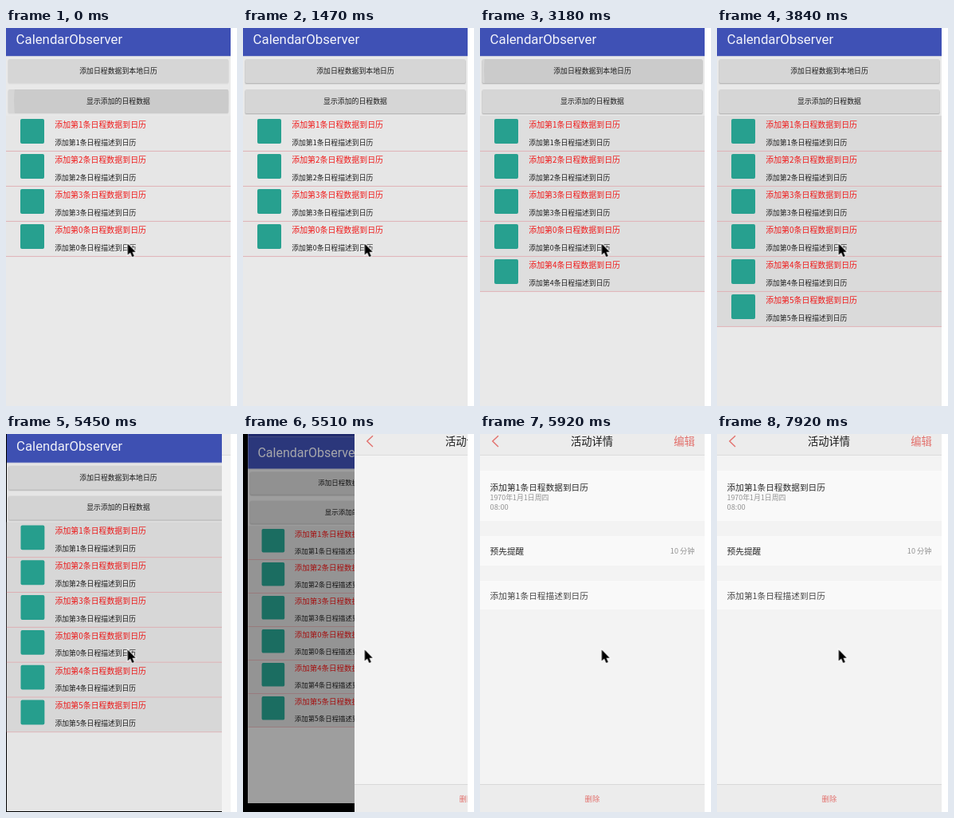
An HTML page for the animation above (8000 ms loop, 290 px wide and 474 px high).

```html
<!DOCTYPE html>
<html lang="zh-CN">
<head>
<meta charset="utf-8">
<title>CalendarObserver</title>
<style>
html, body { margin: 0; width: 290px; height: 474px; overflow: hidden; background: #fff; }
svg { display: block; }
text { font-family: "Noto Sans CJK SC", "Noto Sans CJK", sans-serif; }
.bar-title { font-family: Roboto, sans-serif; }
.row-back { fill: inherit; }

#add-lift, #show-lift, #add-ripple, #show-ripple, #rows { animation: 8s linear infinite; }
#app, #dim, #sheet, #footer, #detail, #row4, #row5 { animation: 8s step-end infinite; }
#app { transform-origin: 141px 223px; animation-name: shrink; }
#dim { animation-name: dim; }
#sheet { animation-name: slide; }
#footer { animation-name: footer; }
#detail { animation-name: detail; }
#row4 { animation-name: row4; }
#row5 { animation-name: row5; }
#rows { animation-name: shade; }
#add-ripple { animation-name: add-ripple; }
#show-ripple { animation-name: show-ripple; }
#add-lift { animation-name: add-lift; }
#show-lift { animation-name: show-lift; }

@keyframes add-ripple {
  0%, 7.87% { r: 0; opacity: .06; }
  10% { r: 140px; opacity: .06; }
  12.5% { r: 140px; opacity: 0; }
  12.51%, 35.5% { r: 0; opacity: .05; }
  37.6%, 43.37% { r: 140px; opacity: .05; }
  46%, 100% { r: 140px; opacity: 0; }
}
@keyframes show-ripple {
  0%, 1.49% { r: 135px; opacity: .05; }
  1.5%, 17.62% { r: 140px; opacity: .04; }
  18.37% { r: 140px; opacity: 0; }
  18.38%, 43.37% { r: 0; opacity: .06; }
  45.5% { r: 140px; opacity: .06; }
  48%, 100% { r: 140px; opacity: 0; }
}
@keyframes add-lift {
  0%, 7.87% { opacity: .3; }
  12.5%, 100% { opacity: 1; }
}
@keyframes show-lift {
  0%, 17.62% { opacity: .2; }
  18.37%, 100% { opacity: 1; }
}
@keyframes shade {
  0%, 20.25% { fill: #e6e6e6; }
  22.5%, 43.37% { fill: #dedede; }
  48%, 100% { fill: #dadada; }
}
@keyframes row4 {
  0% { visibility: hidden; }
  21.25%, 100% { visibility: visible; }
}
@keyframes row5 {
  0% { visibility: hidden; }
  45.5%, 100% { visibility: visible; }
}
@keyframes shrink {
  0% { transform: scale(1); }
  68.125% { transform: scale(.996); }
  68.875% { transform: scale(.955); }
  69.625% { transform: scale(.915); }
  70.25%, 100% { transform: scale(.908); }
}
@keyframes dim {
  0% { opacity: 0; }
  68.125% { opacity: .015; }
  68.875% { opacity: .32; }
  69.625% { opacity: .58; }
  70.25%, 100% { opacity: .62; }
}
@keyframes slide {
  0% { transform: translateX(282px); }
  68.125% { transform: translateX(271px); }
  68.875% { transform: translateX(140px); }
  69.625% { transform: translateX(42px); }
  70.25% { transform: translateX(17px); }
  71% { transform: translateX(6px); }
  71.75% { transform: translateX(2px); }
  72.5%, 100% { transform: translateX(0); }
}
@keyframes footer {
  0% { visibility: hidden; }
  68.875%, 100% { visibility: visible; }
}
@keyframes detail {
  0% { opacity: 0; }
  71.75% { opacity: .5; }
  72.5%, 100% { opacity: 1; }
}
</style>
</head>
<body>
<svg id="stage" width="290" height="474" viewBox="0 0 290 474"></svg>
<script>
const rect = (x, y, w, h, fill, more = '') =>
  `<rect x="${x}" y="${y}" width="${w}" height="${h}" fill="${fill}" ${more}/>`;

// cy is the visual middle of the line
const text = (x, cy, size, fill, str, more = '') =>
  `<text x="${x}" y="${(cy + size * .38).toFixed(2)}" font-size="${size}" fill="${fill}" ${more}>${str}</text>`;

const middle = 'text-anchor="middle"';
const medium = 'font-weight="500"';

const button = (id, y, label) =>
  `<clipPath id="${id}-clip">${rect(2.5, y, 277, 30, '#000', 'rx="2"')}</clipPath>` +
  `<g id="${id}-lift">` +
  rect(2, y + 1, 278, 31, '#000', 'rx="2" opacity=".07"') +
  rect(2.5, y + 1, 277, 30, '#000', 'rx="2" opacity=".14"') + '</g>' +
  rect(2.5, y, 277, 30, '#d6d6d6', 'rx="2"') +
  `<g clip-path="url(#${id}-clip)"><circle id="${id}-ripple" cx="145" cy="${y + 15}"/></g>` +
  text(141, y + 14.6, 8.9, '#1c1c1c', label, `${middle} ${medium}`);

const row = (n, i) => {
  const y = 110 + i * 44;
  return `<g id="row${i}">` +
    rect(0, y, 282, 44, '', 'class="row-back"').replace('fill="" ', '') +
    rect(18, y + 4, 30, 31, '#27a08f', 'rx="2"') +
    text(61.2, y + 11.2, 9.95, '#f01818', `添加第${n}条日程数据到日历`) +
    text(61.2, y + 33.2, 8.85, '#1c1c1c', `添加第${n}条日程描述到日历`, medium) +
    rect(0, y + 43.9, 282, 1, '#e0b2b6') + '</g>';
};

// later rows go underneath, so each divider stays on top
const rows = [1, 2, 3, 0, 4, 5].map(row).reverse().join('');

const app =
  rect(0, -28, 282, 502, '#e9e9e9') +
  rect(0, -28, 282, 21, '#303f9f') +
  rect(0, 35, 282, 1, '#c3c7dc') +
  rect(0, -7, 282, 42, '#3f51b5') +
  '<text class="bar-title" x="12.6" y="20" font-size="16.8" fill="#f3f4fb">CalendarObserver</text>' +
  button('add', 39, '添加日程数据到本地日历') +
  button('show', 77, '显示添加的日程数据') +
  `<g id="rows">${rows}</g>` +
  rect(0, -28, 282, 502, '#000', 'id="dim"');

const red = '#e2706c';
const card = (y, h) => rect(0, y, 282, h, '#f9f9f9');

const detail =
  card(46, 63) + card(128, 37) + card(184, 36) +
  text(12.5, 67, 10.7, '#2a2a2a', '添加第1条日程数据到日历', medium) +
  text(12.5, 80, 8.9, '#929292', '1970年1月1日周四') +
  text(12.5, 91, 9.3, '#929292', '08:00') +
  text(12.5, 146.5, 10.7, '#2a2a2a', '预先提醒', medium) +
  text(269.5, 146.5, 9.2, '#929292', '10 分钟', 'text-anchor="end"') +
  text(12.5, 202.5, 10.7, '#484848', '添加第1条日程描述到日历');

const footer =
  rect(0, 439, 282, 35, '#ececec') + rect(0, 439, 282, 1, '#d8d8d8') +
  text(141, 457.5, 9.4, red, '删除', `${middle} ${medium}`);

const sheet =
  rect(0, 0, 282, 474, '#f3f3f3') +
  rect(0, 0, 282, 26, '#ececec') + rect(0, 26, 282, 1, '#dcdcdc') +
  `<path d="M23 2.2 15.8 9 23 16" fill="none" stroke="${red}" stroke-width="1.4"/>` +
  text(140.5, 9, 13.3, '#1a1a1a', '活动详情', `${middle} ${medium}`) +
  text(256.5, 9, 13.3, red, '编辑', middle) +
  `<g id="footer">${footer}</g><g id="detail">${detail}</g>`;

const cursor =
  '<path transform="translate(152.8 270.5) scale(.87)" d="M0 0v16.2l3.7-3.4 2.7 6.1 2.8-1.2-2.6-5.9h4.8z" stroke="#fff" stroke-width="2" paint-order="stroke"/>';

document.getElementById('stage').innerHTML =
  '<clipPath id="screen"><rect width="282" height="474"/></clipPath>' +
  `<g clip-path="url(#screen)">${rect(0, 0, 282, 474, '#000')}` +
  `<g id="app">${app}</g><g id="sheet">${sheet}</g>${cursor}</g>`;
</script>
</body>
</html>
```
